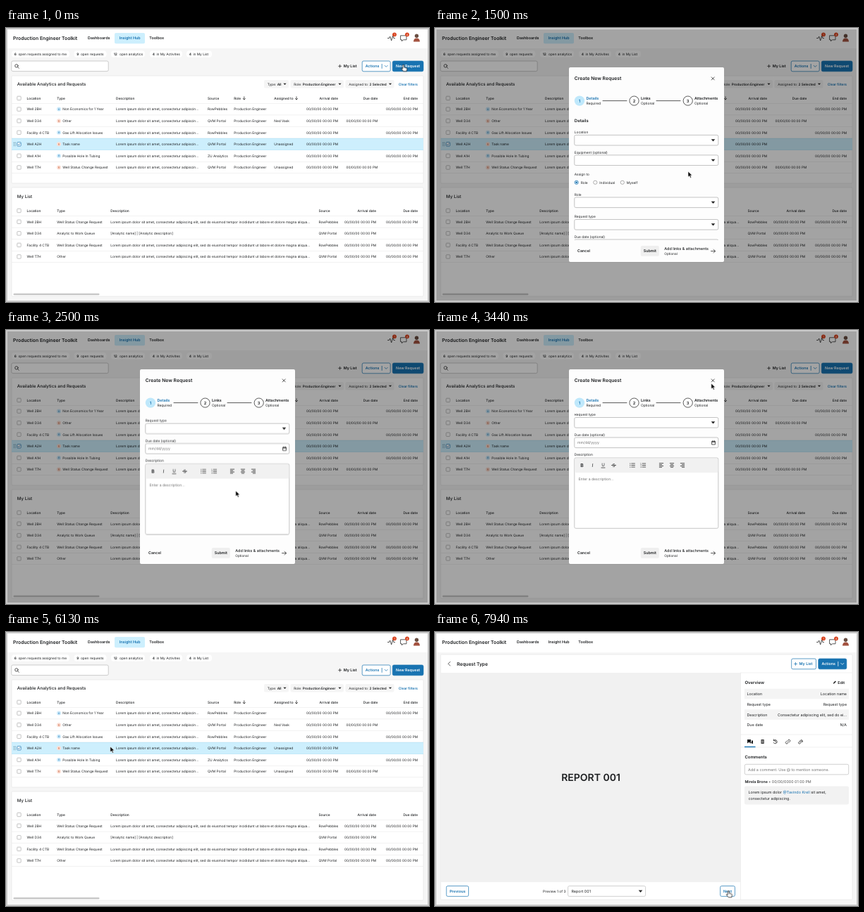
An HTML page that plays this animation: 600x390 px, repeating every 8000 ms.

```html
<!DOCTYPE html>
<html lang="en">
<head>
<meta charset="utf-8">
<title>Request toolkit</title>
<style>
  html, body { margin: 0; width: 100%; height: 100%; overflow: hidden; background: #cacaca; }
  svg { display: block; width: 100vw; height: 100vh; }
  text { font-family: Inter, "Open Sans", sans-serif; fill: #1d1f21; text-rendering: geometricPrecision; }
  .b { font-weight: 600; }
  .m { font-weight: 500; }
  .end { text-anchor: end; }
  .mid { text-anchor: middle; }
  .blue { fill: #1873b1; }
  .white { fill: #fff; }
  .dim { fill: #737373; }
  .line { fill: none; stroke: #222; stroke-width: .75; stroke-linecap: round; stroke-linejoin: round; }
  .stroke-blue { stroke: #1873b1; }
  .stroke-white { stroke: #fff; }
</style>
</head>
<body>
<svg id="stage" viewBox="0 0 600 390"></svg>
<script>
const LOOP = 8000;
const BLUE = '#1873b1', SKY = '#cdeffd', RULE = '#e4e4e4', SOFT = '#f2f2f2';
const SMALL = 4.82;

// Shape helpers; text is placed by its vertical centre.
const text = (x, y, str, size = SMALL, cls = '') =>
  `<text x="${x}" y="${(y + size * .364).toFixed(2)}" font-size="${size}" class="${cls}">${str}</text>`;
const box = (x, y, w, h, fill = '#fff', stroke = 'none', r = 0) =>
  `<rect x="${x}" y="${y}" width="${w}" height="${h}" rx="${r}" fill="${fill}" stroke="${stroke}" stroke-width=".7"/>`;
const dot = (x, y, r, fill, stroke = 'none') =>
  `<circle cx="${x}" cy="${y}" r="${r}" fill="${fill}" stroke="${stroke}" stroke-width=".8"/>`;
const line = (d, cls = '') => `<path class="line ${cls}" d="${d}"/>`;
const rule = (x, y, w, color = RULE) => box(x, y - .25, w, .5, color);
const caret = (x, y, s = 1) => `<path d="M${x - 2.8 * s} ${y - 1.5 * s}h${5.6 * s}l${-2.8 * s} ${3.2 * s}z" fill="#222"/>`;
const chevron = (x, y, cls) => line(`M${x - 2} ${y - 1}l2 2 2-2`, cls);
const plus = (x, y, cls) => line(`M${x - 2} ${y}h4m-2-2v4`, cls);
const group = (id, body, attrs = '') => `<g id="${id}" ${attrs}>${body}</g>`;
const button = (x, y, w, h, label, solid) =>
  box(x, y, w, h, solid ? BLUE : '#fff', BLUE, 2) +
  (label ? text(x + w / 2, y + h / 2, label, 5.35, `b mid ${solid ? 'white' : 'blue'}`) : '');
const check = (y, on) => box(15.8, y - 2.7, 5.4, 5.4, '#fff', on ? BLUE : '#aaa', .8) +
  (on ? line(`M17 ${y}l1.2 1.2 2-2.4`, 'stroke-blue') : '');

const badge = (x, n) => dot(x, 9.3, 2.9, '#d8431f') + text(x, 9.3, n, 3.8, 'mid white');

const header = box(2, 2, 596, 27) +
  text(10, 14.5, 'Production Engineer Toolkit', 6.85, 'b') +
  text(116, 14.5, 'Dashboards', 5.42, 'b') +
  text(160.8, 14.5, 'Insight Hub', 5.42, 'b') +
  text(203.3, 14.5, 'Toolbox', 5.42, 'b') +
  line('M541.5 14.5h2l1.2-2.5 2 6 2-7 1.2 3.5h1.6') + badge(551, 1) +
  line('M560 10.8h8v6h-4.5l-2 2v-2H560z') + badge(569, 4) +
  dot(582.5, 11.3, 2.7, '#6a4e42') +
  '<path d="M578 19.6q.2-5 4.5-5t4.5 5z" fill="#a3523f"/>';

const actions = (x, y, solid) => {
  const cls = solid ? 'stroke-white' : 'stroke-blue', mid = y + 7.4;
  return button(x, y, 40, 14.8, '', solid) +
    text(x + 4.6, mid, 'Actions', 5.35, `b ${solid ? 'white' : 'blue'}`) +
    line(`M${x + 28} ${mid - 3}v6`, cls) + chevron(x + 34, mid, cls);
};

const chips = [
  [8, 82, '6', 'open requests assigned to me'], [96.5, 46, '9', 'open requests'],
  [149, 48, '12', 'open analytics'], [204, 46, '4', 'in My Activites'], [256, 36, '4', 'in My List']
].map(([x, w, n, label]) => box(x, 32.3, w, 9.4, '#fff', 'none', 4) +
  text(x + 3.8, 37, n, SMALL, 'b') + text(x + (n > 9 ? 12 : 9.4), 37, label)).join('');

const filters = [[366, 35, 'Type:', 'All'], [403.5, 75.5, 'Role:', 'Production Engineer'], [481.5, 69, 'Assigned to:', '2 Selected']]
  .map(([x, w, key, value]) => box(x, 74, w, 11.6, '#f5f5f5', 'none', 2) +
    text(x + 4.8, 79.8, `${key} <tspan class="b">${value}</tspan>`, 4.75) + caret(x + w - 5.5, 79.8, .75)).join('');

const STAMP = '00/00/00 00:00 PM';
const LOREM = 'Lorem ipsum dolor sit amet, consectetur adipiscin';
const STATUS = 'Well Status Change Request';

// Flags in the last field: a = arrival, d = due, e = end.
const requests = [
  ['Well 2BH', 'A', 'Non Economics for 1 Year', 'RowPebbles', '', 'ae'],
  ['Well D34', 'R', 'Other', 'QVM Portal', 'Ned Vask', 'ad'],
  ['Facility 4 CTB', 'A', 'Gas Lift Allocation Issues', 'RowPebbles', '', 'ae'],
  ['Well A2H', 'R', 'Task name', 'QVM Portal', 'Unassigned', 'a'],
  ['Well A1H', 'A', 'Possible Hole In Tubing', 'ZU Analytics', '', 'ae'],
  ['Well T7H', 'R', STATUS, 'QVM Portal', 'Unassigned', 'ad']
];
const stamps = (flags, y, columns) => columns.map(([flag, x]) =>
  flags.includes(flag) ? text(x, y, STAMP, SMALL - .05, 'end') : '').join('');
const titles = (y, left, right) => check(y) +
  left.map(([x, s]) => text(x, y, s, SMALL, 'm')).join('') +
  right.map(([x, s]) => text(x, y, s, SMALL, 'm end')).join('');
const sortArrow = x => line(`M${x} 97.8v4.2m-1.6-1.6l1.6 1.6 1.6-1.6`);

const requestRows = requests.map(([place, kind, type, source, owner, flags], i) => {
  const y = 115.6 + i * 16.58, on = i === 3, analytic = kind === 'A';
  const grip = [0, 1, 2, 3, 4, 5].map(k => dot(11.2 + k % 2 * 2, y - 2.2 + (k >> 1) * 2.2, .55, '#4a7f9a')).join('');
  return (on ? box(8, y - 8.2, 584, 16.5, SKY) + rule(8, y - 8.2, 584, '#a5dcf2') + grip : '') +
    rule(8, y + 8.3, 584, on ? '#a5dcf2' : RULE) + check(y, on) + text(29.5, y, place) +
    dot(75, y, 3, analytic ? '#cdeafa' : '#fbded4') +
    text(75, y, kind, 3.8, 'mid').replace('<text', `<text style="fill:${analytic ? BLUE : '#c9643f'}"`) +
    text(80.3, y, type) + text(156, y, LOREM + '...') + text(286, y, source) +
    text(323.2, y, 'Production Engineer') + text(380.3, y, owner) +
    stamps(flags, y, [['a', 471], ['d', 527.3], ['e', 584]]);
}).join('');

const myList = [
  ['Well 2BH', STATUS, 'RowPebbles', 'ad'], ['Well D34', 'Analytic to Work Queue', 'QVM Portal', 'a'],
  ['Facility 4 CTB', STATUS, 'RowPebbles', 'ad'], ['Well T7H', 'Other', 'QVM Portal', 'ad']
].map(([place, type, source, flags], i) => {
  const y = 275.8 + i * 16.55;
  const note = i === 1 ? '[Analytic name] | [Analytic description]'
    : LOREM + 'g elit, sed do eiusmod tempor incididunt ut labore et dolore magna aliqua...';
  return rule(8, y + 8.3, 584) + check(y) + text(29.5, y, place) + text(72.3, y, type) +
    text(148.3, y, note) + text(443.4, y, source) + stamps(flags, y, [['a', 525], ['d', 584]]);
}).join('');

const listPage = box(154, 7, 43, 15.2, SKY, 'none', 2) + text(160.8, 14.5, 'Insight Hub', 5.42, 'b blue') +
  chips + box(7.8, 47, 137.4, 14.6, '#fff', '#b8b8b8', 2) +
  line('M16.6 55.6l1.7 1.7') + '<circle class="line" cx="14.9" cy="53.9" r="2.2"/>' +
  plus(473.6, 54.3) + text(478.8, 54.3, 'My List', 5.4, 'b') +
  actions(505.2, 47, false) + button(548.3, 47, 43.7, 14.8, 'New Request', true) +
  box(8, 68, 584, 153, '#fff', '#e6e6e6', 1) +
  text(15.8, 79.8, 'Available Analytics and Requests', 6.2, 'm') + filters +
  text(584, 79.8, 'Clear filters', 4.85, 'b blue end') +
  titles(99.9, [[29.5, 'Location'], [72.3, 'Type'], [156, 'Description'], [286, 'Source'], [323.2, 'Role'], [380.3, 'Assigned to']],
    [[471, 'Arrival date'], [527.3, 'Due date'], [584, 'End date']]) +
  sortArrow(337.8) + sortArrow(412) + rule(8, 107.4, 584) + requestRows +
  box(8, 227, 584, 155, '#fff', '#e6e6e6', 1) + text(15.8, 240, 'My List', 6.2, 'm') +
  titles(260, [[29.5, 'Location'], [72.3, 'Type'], [148.3, 'Description'], [443.4, 'Source']],
    [[525, 'Arrival date'], [584, 'Due date']]) +
  rule(8, 267.5, 584) + myList + box(10.5, 377.8, 122, 2.4, '#c8c8c8', 'none', 1.2);

const facts = [['Location', 'Location name'], ['Request type', 'Request type'],
  ['Description', 'Consectetur adipiscing elit, sed do ei...'], ['Due date', 'N/A']]
  .map(([key, value], i) => {
    const y = 88 + i * 14.8;
    return (i % 2 ? '' : box(439, y - 7.3, 148, 14.6, '#f4f4f4')) +
      text(442.5, y, key, 5.35) + text(584, y, value, 5.35, 'end');
  }).join('');

const tabs = '<path d="M443 153h5v4h-3l-2 1.5zM449 154.5h2v5l-1.6-1.2h-3.2v-1h2.8z" fill="#1d1f21"/>' +
  box(462.5, 153, 4.2, 6, '#333', 'none', .5) + line('M463.6 155h2m-2 2h2', 'stroke-white') +
  line('M480.3 154.6a2.7 2.7 0 1 1-.2 2.8m.2-4.6v2h2m.8-.3v2l1.4.8') +
  line('M499.8 157l1.8-1.8m-1.6-.5l1-1a1.6 1.6 0 0 1 2.3 2.3l-1 1m-1.2.6l-1 1a1.6 1.6 0 0 1-2.3-2.3l1-1') +
  line('M517.2 157.2l2.2-2.2a.8.8 0 0 1 1.1 1.1l-2.6 2.6a1.4 1.4 0 0 1-2-2l2.8-2.8a1.9 1.9 0 0 1 2.6 2.6');

const detailPage = box(8, 32, 584, 349, '#fff', '#e6e6e6', 1) +
  line('M21.5 42.4l-2.8 2.8 2.8 2.8') + text(31, 45.2, 'Request Type', 6.65, 'b') +
  button(505.7, 38, 34.8, 14.8) + plus(511.5, 45.4, 'stroke-blue') + text(516.6, 45.4, 'My List', 5.4, 'b blue') +
  actions(543.8, 38, true) + box(8, 58, 425, 298, '#f1f1f1') + rule(433, 58, 159) +
  box(433, 58, .6, 323, RULE) + text(221, 207.3, 'REPORT 001', 14, 'b mid') +
  text(439.4, 71.7, 'Overview', 6, 'b') + text(571.3, 71.7, 'Edit', 5.35, 'b') +
  '<path d="M564.8 73.7l.4-1.5 2.6-2.6 1.1 1.1-2.6 2.6z" fill="#222"/>' + facts +
  rule(433, 146, 159) + tabs + rule(433, 164, 159) + box(439, 162.8, 15.5, 1.4, BLUE) +
  text(439.4, 177.8, 'Comments', 6, 'b') + box(439.3, 188.3, 147.4, 14.6, '#fff', '#bdbdbd', 2) +
  text(444, 195.6, 'Add a comment. Use @ to mention someone.', 5.4, 'dim') +
  text(439.4, 213, 'Mirela Brone <tspan font-weight="400" fill="#555">• 00/00/0000 01:00 PM</tspan>', 5.35, 'b') +
  box(439, 219.5, 148, 26, SOFT, 'none', 2) +
  text(444.5, 228.5, 'Lorem ipsum dolor <tspan class="blue">@Tavindo Krell</tspan> sit amet,', 5.4) +
  text(444.5, 236.9, 'consectetur adipiscing.', 5.4) +
  button(16.2, 361.5, 31.4, 14.8, 'Previous') + text(153, 369, 'Preview 1 of 3', 4.95) +
  box(188.6, 361.5, 110, 14.8, '#fff', '#bdbdbd', 2) + text(193.4, 369, 'Report 001', 5.4) + caret(291.5, 369) +
  button(404.6, 361.5, 20.8, 14.8, 'Next');

const steps = [['Details', 'Required', 205, 214.4], ['Links', 'Optional', 282.5, 292], ['Attachments', 'Optional', 358.7, 368]]
  .map(([name, note, cx, tx], i) => dot(cx, 103.6, i ? 6.6 : 7.2, i ? '#fff' : '#bfe8fb', i ? '#333' : 'none') +
    text(cx, 103.6, i + 1, 5.8, i ? 'b mid' : 'b mid blue') +
    text(tx, 100, name, 5.4, i ? 'b' : 'b blue') + text(tx, 107.4, note, 4.9)).join('') +
  line('M238 103.6h34M314 103.6h34');

const field = (label, y) => text(197.8, y, label, 4.8) + box(197.8, y + 4, 204, 14.6, '#fff', '#a9a9a9', 2);
const select = (label, y) => field(label, y) + caret(394.5, y + 11.3);
const radio = (x, label, on) => dot(x, 219.8, 2.6, '#fff', on ? BLUE : '#999') +
  (on ? dot(x, 219.8, 1.4, BLUE) : '') + text(x + 6, 219.8, label, 4.85);
const bars = (x, pad) => [0, 1, 2, 3].map(i => {
  const w = i % 2 ? 3.4 : 5.4;
  return line(`M${x - 2.7 + (5.4 - w) * pad} ${337.7 + i * 1.9}h${w}`);
}).join('');
const bullets = (x, mark) => [0, 1, 2].map(i => {
  const y = 338 + i * 2.5;
  return line(`M${x - 1.2} ${y}h4.6`) + (mark ? text(x - 4, y, i + 1, 2.6) : dot(x - 3.2, y, .6, '#222'));
}).join('');

const editor = box(197.8, 330, 204, 100.3, '#fff', '#b0b0b0', 2) + box(198.2, 330.4, 203.2, 20.6, '#f1f1f1', 'none', 2) +
  text(208.5, 340.4, 'B', 6.8, 'b mid') + text(223.5, 340.4, '<tspan font-style="italic">I</tspan>', 6.8, 'mid') +
  text(238.5, 339.8, 'U', 6.2, 'mid') + line('M236 344h5') +
  text(253.5, 340.4, 'S', 6.6, 'mid') + line('M250.5 340.5h6') +
  bullets(280, false) + bullets(295.3, true) + bars(321, 0) + bars(336, .5) + bars(351, 1) +
  text(203.5, 360.2, 'Enter a description...', 5.15, 'dim');

const form = text(197.8, 132, 'Details', 6, 'b') +
  select('Location', 148.4) + select('Equipment (optional)', 176.9) +
  text(197.8, 208.3, 'Assign to', 4.8) +
  radio(200.7, 'Role', true) + radio(227.3, 'Individual') + radio(265.8, 'Myself') +
  select('Role', 237) + select('Request type', 268.5) + field('Due date (optional)', 297) +
  text(202, 308.6, 'mm/dd/yyyy', 5.2, 'dim') +
  line('M393 306.4h4.4v4.6H393zM393 307.6h4.4M394 305.6v.8m2.4-.8v.8') +
  text(197.8, 325.5, 'Description', 4.8) + editor;

const modal = '<rect x="2" y="2" width="596" height="386" opacity=".36"/>' +
  box(190, 56, 220, 277, '#fdfdfd', 'none', 2) + text(197.8, 71.8, 'Create New Request', 6.75, 'b') +
  line('M392.2 69.9l4 4m0-4l-4 4') + steps +
  `<g clip-path="url(#view)">${group('form', form)}</g>` +
  text(202, 317.5, 'Cancel', 5.35, 'b') + box(291.8, 310, 26, 14.8, '#efefef', 'none', 2) +
  text(304.8, 317.5, 'Submit', 5.35, 'b mid') +
  text(325.3, 314.2, 'Add links &amp; attachments', 5.45, 'm') + text(325.3, 321.4, 'Optional', 4.7) +
  line('M391.5 317.6h6m-2.4-2.4l2.4 2.4-2.4 2.4');

const arrow = '<path d="M0 0v8l1.9-1.7 1.3 2.9 1.4-.6-1.3-2.8h2.6z" fill="#000" stroke="#fff" stroke-width=".6"/>';
const hand = '<path d="M-1 1a1 1 0 0 1 2 0v2.8l3 .6q1.3.4 1.1 1.9l-.6 3H-.1l-2.7-3.4q-.4-1.1.8-1l1 .8z" fill="#fff" stroke="#111" stroke-width=".75" stroke-linejoin="round"/>';

const $ = id => document.getElementById(id);
$('stage').innerHTML = '<clipPath id="view"><rect x="190" y="119" width="220" height="183"/></clipPath>' +
  box(0, 0, 600, 390, '#cacaca') + box(2, 2, 596, 386, '#f6f6f6') + header +
  group('list', listPage) + group('detail', detailPage) + group('modal', modal) +
  group('cursor', group('arrow', arrow) + group('hand', hand));

// Rows are [ms, value, easing towards the next row]; without easing the value holds.
const start = document.timeline.currentTime ?? 0;
function play(id, prop, rows) {
  const last = rows[rows.length - 1];
  const frames = [...rows, [LOOP, last[1]]].map(([ms, value, easing = 'steps(1)']) =>
    ({ offset: ms / LOOP, [prop]: value, easing }));
  $(id).animate(frames, { duration: LOOP, iterations: Infinity }).startTime = start;
}
const at = (x, y) => `translate(${x}px, ${y}px)`;
const SMOOTH = 'cubic-bezier(.37, 0, .63, 1)';

play('list', 'opacity', [[0, 1], [6310, 0]]);
play('detail', 'opacity', [[0, 0], [6310, 1]]);
play('modal', 'opacity', [[0, 0], [440, 1], [3800, 0]]);
play('form', 'transform', [[0, at(0, 0)], [1997, at(0, 0), SMOOTH], [2594, at(0, -148)], [4000, at(0, 0)]]);
play('hand', 'opacity', [[0, 1], [440, 0], [7340, 1]]);
play('arrow', 'opacity', [[0, 0], [440, 1], [7340, 0]]);
play('cursor', 'transform', [
  [0, at(563.7, 52.3)], [920, at(563.7, 52.3), SMOOTH],
  [1690, at(325.7, 228.8)], [2620, at(325.7, 228.8), SMOOTH],
  [3440, at(391.7, 76), 'ease-out'], [3560, at(392.5, 69)],
  [4150, at(392.5, 69), SMOOTH], [4700, at(150, 174.5), SMOOTH],
  [4940, at(147.8, 163)], [6570, at(147.8, 163), SMOOTH], [7440, at(416.3, 368.3)]
]);
</script>
</body>
</html>
```
